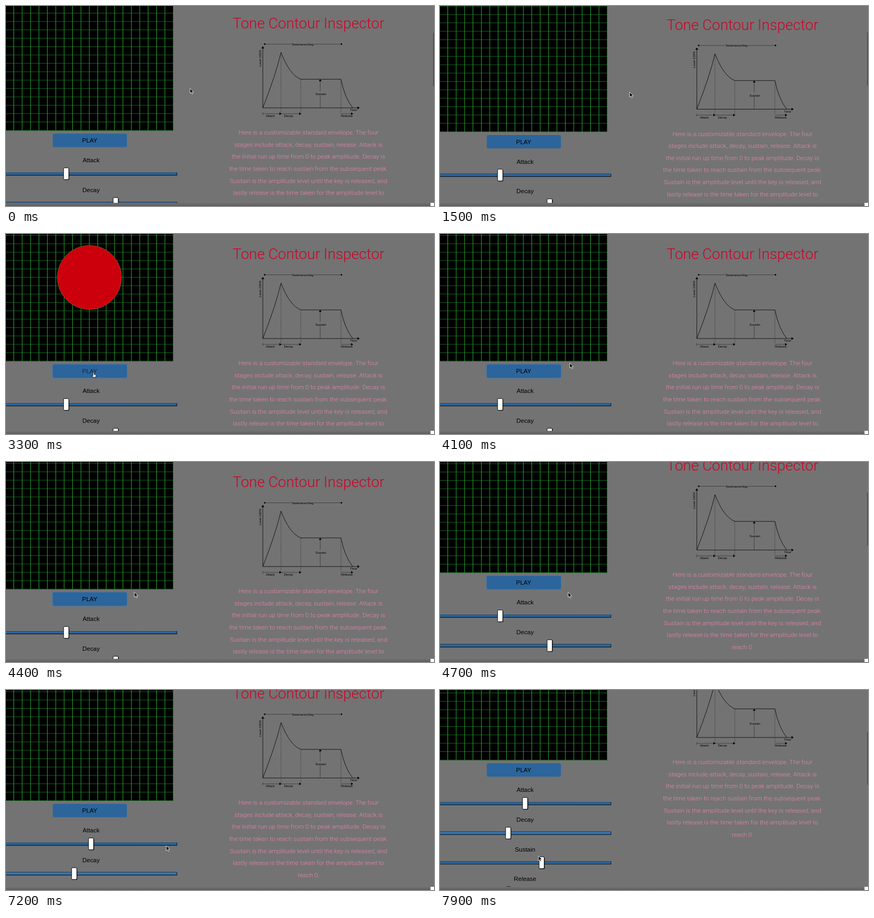
These frames come from a looping animation (800 by 375 pixels, 8000 ms). An HTML page:

```html
<!DOCTYPE html>
<html lang="en">
<head>
<meta charset="utf-8">
<title>Envelope</title>
<style>
html, body { margin: 0; width: 100%; height: 100%; overflow: hidden; background: #737373; }
svg { display: block; width: 800px; height: 375px; text-anchor: middle; font: 11.4px "Liberation Sans", Arial, sans-serif; }
.title, .body { font-family: Roboto, "Liberation Sans", sans-serif; font-weight: 300; }
.title { font-size: 27.5px; fill: #cc0528; }
.body { font-size: 11.7px; fill: #ea86b0; }
.small { font-size: 6px; }
.italic { font-style: italic; }
.ink { fill: none; stroke: #000; stroke-width: .8; }
.thin { fill: none; stroke: #222; stroke-width: .6; }
.dash { stroke-dasharray: 2 1.5; }
.track { fill: #2b659c; }
.focus .track { fill: #3674b0; }
.glow { fill: none; stroke: #3a7cc4; stroke-width: 1.6; opacity: 0; }
.focus .glow { opacity: .65; }
.hover text { opacity: .6; }
</style>
</head>
<body>
<svg viewBox="0 0 800 375">
  <defs>
    <clipPath id="view"><rect width="800" height="369.3"/></clipPath>
    <linearGradient id="edge" x2="0" y2="1">
      <stop stop-color="#717171"/><stop offset="1" stop-color="#5e5e5e"/>
    </linearGradient>
  </defs>
  <rect width="800" height="375" fill="#737373"/>
  <g clip-path="url(#view)">
    <g id="page">
      <rect x="-1" y="-75" width="314" height="313.5"/>
      <path id="rows" stroke="#0e6418" fill="none"/>
      <path id="cols" stroke="#28ac33" fill="none"/>
      <circle id="ball" cx="156" cy="81.5" fill="#cc000c" stroke="#56704a" stroke-width=".7"/>

      <g id="play">
        <rect class="glow" x="87" y="244" width="139.5" height="26" rx="3.5"/>
        <rect x="87.5" y="244.5" width="138.5" height="25" rx="2.5" fill="#2b659c"/>
        <text x="156.5" y="261">PLAY</text>
      </g>
      <g id="sliders"></g>

      <text class="title" x="565.5" y="47">Tone Contour Inspector</text>
      <g id="chart">
        <path class="thin" d="M483 76.5H532M576 76.5H627"/>
        <circle cx="483.5" cy="76.5" r="1.4"/><circle cx="627" cy="76.5" r="1.4"/>
        <path class="ink" d="M480 84V196H657"/>
        <path class="ink" d="M480 196Q504 135 514 92Q530 134 551 142.3H626Q633 177 648 196"/>
        <path class="thin dash" d="M514 94V205M551 143V205M626 143V205"/>
        <path class="thin" d="M587.3 196V173M587.3 165V144M480 207H512M514 207H549M626 207H646M480 204.5V209.5"/>
        <path d="M480 80.5l2.8 4h-5.6zM661 196l-4 2.8v-5.6zM587.3 142l2.5 4h-5zM515 207l-4 2.5v-5zM552 207l-4 2.5v-5zM649 207l-4 2.5v-5z"/>
        <g class="small">
          <text x="554" y="78.5">Tastenanschlag</text>
          <text x="588.5" y="172">Sustain</text>
          <text x="494" y="213">Attack</text>
          <text x="528" y="213">Decay</text>
          <text x="637" y="213">Release</text>
          <text class="italic" x="649.5" y="202">Time</text>
          <text class="italic" transform="translate(477 103) rotate(-90)">Level 100%</text>
        </g>
      </g>
      <g id="copy" class="body"></g>
    </g>
  </g>
  <rect y="369.3" width="800" height="5.7" fill="url(#edge)"/>
  <rect x="793.5" y="369" width="6.5" height="6" fill="#fff"/>
  <rect id="bar" x="798.5" width="1.5" height="100" rx=".7" fill="#4a4a4a"/>
  <g id="cursor">
    <path id="arrow" d="M0 0v9.2l2.2-2 1.6 3.6 1.6-.7-1.6-3.4h3z" stroke="#fff" stroke-width=".8"/>
    <path id="hand" d="M0 0q1 0 1 1v3l3 .8q1 .3.8 1.6l-.6 3.4h-4.6l-2.6-3.6q.4-1 1.6 0l.4.6v-6q0-.8 1-.8z" fill="#fff" stroke="#000" stroke-width=".8"/>
  </g>
</svg>
<script>
const $ = id => document.getElementById(id);
const LOOP = 8000, STEP = 100, CELL = 15.7;
const CLICK = 2430, PEAK = 99;

const copy = [
  "Here is a customizable standard envelope. The four",
  "stages include attack, decay, sustain, release. Attack is",
  "the initial run up time from 0 to peak amplitude. Decay is",
  "the time taken to reach sustain from the subsequent peak.",
  "Sustain is the amplitude level until the key is released, and",
  "lastly release is the time taken for the amplitude level to",
  "reach 0."
];
$("copy").innerHTML = copy.map((line, i) =>
  `<text x="565.5" y="${246 + i * 22.65}">${line}</text>`).join("");

const lines = (n, draw) => Array.from({ length: n }, (_, k) => draw(k * CELL)).join("");
$("cols").setAttribute("d", lines(20, d => `M${312.8 - d} -75V238.5`));
$("rows").setAttribute("d", lines(16, d => `M0 ${238.2 - d}H313`));

$("sliders").innerHTML = ["Attack", "Decay", "Sustain", "Release"].map((name, i) => `
  <g id="${name}" transform="translate(0 ${319.5 + i * 55.7})">
    <text x="159" y="-21.3">${name}</text>
    <rect x="-10" y="-2.6" width="330" height="5.8" rx="1"/>
    <rect class="track" x="-10" y="-2.3" width="329.3" height="4.6" rx=".8"/>
    <g class="thumb">
      <rect x="-4.3" y="-10.4" width="10" height="22.2" rx="2"/>
      <rect x="-4.8" y="-11" width="9.6" height="22" rx="1.8" fill="#fff" stroke="#000" stroke-width=".9"/>
    </g>
  </g>`).join("");

const ramp = (t, from, to) => Math.min(1, Math.max(0, (t - from) / (to - from)));
const smooth = p => p * p * (3 - 2 * p);
const mix = (a, b, p) => a + (b - a) * p;
const move = (el, x, y) => el.setAttribute("transform", `translate(${x} ${y})`);
const thumb = (name, x) => move($(name).querySelector(".thumb"), x, 0);

const scrolls = [
  { from: 1400, to: 1600, by: 5 },
  { from: 4400, to: 4700, by: -31 },
  { from: 7300, to: 7800, by: -76 }
];
const scrollAt = t => scrolls.reduce((y, s) => y + s.by * smooth(ramp(t, s.from, s.to)), -5);

// The scrollbar lingers after each scroll, then fades.
const fade = (t, end) => 1 - ramp(t, end + 400, end + 700);
const barAt = t => Math.max(fade(t, 0), ...scrolls.map(s => t > s.from ? fade(t, s.to) : 0));

const drags = {
  Attack: { from: 5200, to: 5600, x0: 112.5, x1: 159, y: 287 },
  Decay: { from: 6000, to: 6500, x0: 205, x1: 127.5, y: 342 }
};
const dragAt = (d, t) => mix(d.x0, d.x1, smooth(ramp(t, d.from, d.to)));

const grab = d => [
  { from: d.from - 400, to: d.from - 100, x: d.x0, y: d.y },
  { from: d.from, to: d.to, x: d.x1, y: d.y }
];
const glides = [
  { from: 900, to: 1500, x: 354.5, y: 161.5 },
  { from: 1900, to: 2300, x: 163.5, y: 259 },
  { from: 3300, to: 3900, x: 242.5, y: 242 },
  { from: 4100, to: 4500, x: 239.5, y: 244.5 },
  ...grab(drags.Attack),
  ...grab(drags.Decay),
  { from: 6600, to: 7000, x: 299.5, y: 292 },
  { from: 7300, to: 7800, x: 184, y: 311 }
];
const cursorAt = t => glides.reduce(([x, y], g) => {
  const p = smooth(ramp(t, g.from, g.to));
  return [mix(x, g.x, p), mix(y, g.y, p)];
}, [344, 154.5]);

// Linear attack, exponential decay to sustain, linear release.
function envelope(t) {
  const attack = 325, decay = 200, sustain = .58, hold = 970, release = 300;
  if (t < attack) return Math.max(0, t / attack);
  const level = mix(sustain, 1, Math.exp((attack - t) / decay));
  return level * (1 - ramp(t, hold, hold + release));
}

thumb("Sustain", 190);
thumb("Release", 128);

function draw(t) {
  const scroll = scrollAt(t), [x, y] = cursorAt(t);
  move($("page"), 0, scroll);
  move($("cursor"), x, y);
  $("bar").setAttribute("y", 48.8 - scroll * .273);
  $("bar").setAttribute("opacity", barAt(t));
  $("ball").setAttribute("r", PEAK * envelope(t - CLICK));
  for (const name in drags) thumb(name, dragAt(drags[name], t));

  const hover = x > 87 && x < 226 && y - scroll > 244 && y - scroll < 270;
  $("play").classList.toggle("hover", hover);
  $("hand").style.display = hover ? "" : "none";
  $("arrow").style.display = hover ? "none" : "";

  const { Attack, Decay } = drags;
  const focus = t >= Decay.from ? "Decay" : t >= Attack.from ? "Attack" : t >= CLICK ? "play" : "";
  for (const id of ["play", "Attack", "Decay"]) $(id).classList.toggle("focus", id === focus);
}

function tick() {
  const t = (performance.now() + 10) % LOOP;
  draw(Math.floor(t / STEP) * STEP);
  requestAnimationFrame(tick);
}
tick();
</script>
</body>
</html>
```
